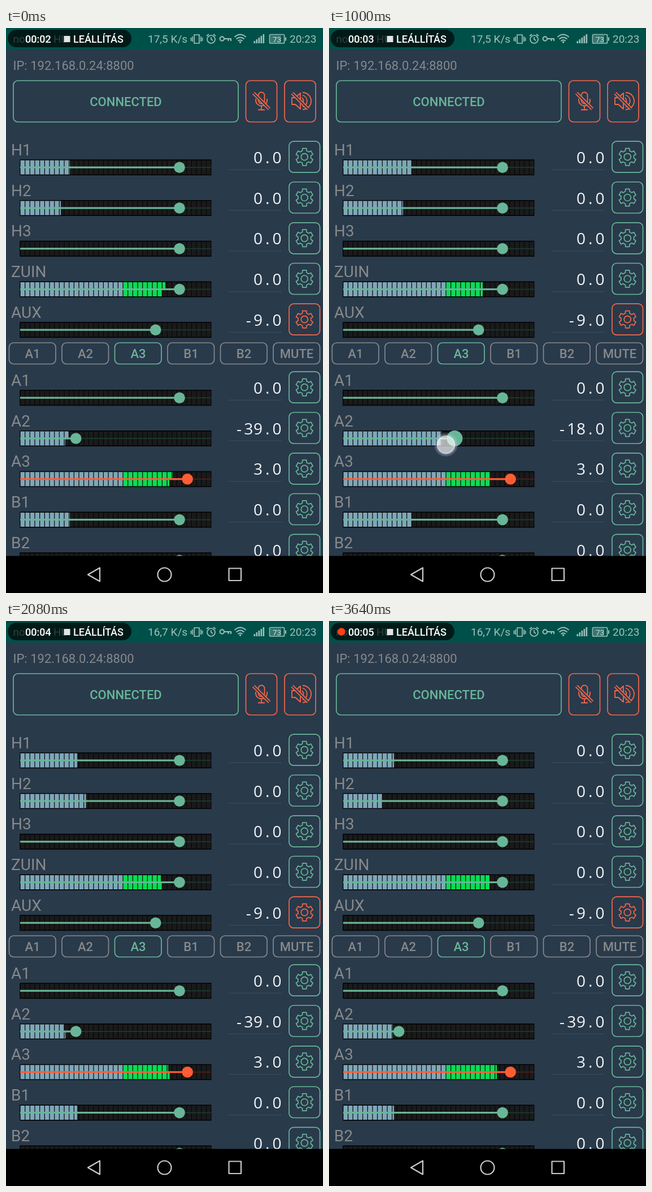
An HTML page with a canvas that plays this animation: 561x998 px, repeating every 3.68 s.

```html
<!DOCTYPE html>
<html lang="hu">
<head>
<meta charset="utf-8">
<style>
  html, body { margin: 0; width: 100%; height: 100%; overflow: hidden; background: #293a4b; }
  canvas { display: block; }
</style>
</head>
<body>
<canvas id="stage" width="561" height="998"></canvas>
<script>
const g = document.getElementById('stage').getContext('2d');
const LOOP = 3680, PX_PER_DB = 4.7, ZERO_X = 307;
const GREEN = '#68b698', ORANGE = '#f4674a', GREY = '#87898a', ICON = '#a0c0bb';

// Meter ends in px at the key times
const KEY_TIMES = [0, 600, 1000, 1600, 2560, 3200, 3640];
const LEVELS = {
  voice: [113, 116, 146, 131, 116, 120, 115],
  second: [97, 92, 131, 189, 89, 96, 94],
  left: [282, 284, 272, 270, 273, 268, 284],
  right: [276, 284, 272, 275, 273, 281, 284]
};
const METER_X = 25, METER_W = 338, SEGMENTS = 39;

const TOUCH_START = 280, TOUCH_END = 1900;
const TOUCH_TIMES = [280, 520, 600, 820, 1000, 1600, 1800];
const TOUCH_X = [123, 211, 214, 226, 207, 140, 123];
const TOUCH_Y = [727, 727, 727, 731, 736, 749, 752];

function tween(t, times, values, wobble = 0) {
  if (t <= times[0]) return values[0];
  const i = times.findIndex(k => k >= t);
  if (i < 0) return values[values.length - 1];
  const u = (t - times[i - 1]) / (times[i] - times[i - 1]);
  const ease = (1 - Math.cos(Math.PI * u)) / 2;
  return values[i - 1] + (values[i] - values[i - 1]) * ease
    + wobble * Math.sin(Math.PI * u) * Math.sin(t / 75);
}

const level = (t, name) => tween(t, KEY_TIMES, LEVELS[name], 5);
const dragDb = t => 3 * Math.round((tween(t, TOUCH_TIMES, TOUCH_X) - ZERO_X) / PX_PER_DB / 3);

function rect(x, y, w, h, color) {
  g.fillStyle = color;
  g.fillRect(x, y, w, h);
}

function disc(x, y, r, color) {
  g.fillStyle = color;
  g.beginPath();
  g.arc(x, y, r, 0, 7);
  g.fill();
}

function text(str, x, y, font, color, align = 'left') {
  g.font = font;
  g.fillStyle = color;
  g.textAlign = align;
  g.fillText(str, x, y);
}

function line(path, color, width = 2, x = 0, y = 0) {
  g.save();
  g.translate(x, y);
  g.strokeStyle = color;
  g.lineWidth = width;
  g.lineJoin = 'round';
  g.stroke(new Path2D(path));
  g.restore();
}

function box(x, y, w, h, color, r = 8) {
  g.strokeStyle = color;
  g.lineWidth = 1.7;
  g.beginPath();
  g.roundRect(x, y, w, h, r);
  g.stroke();
}

function gearPath() {
  const points = [];
  for (let k = 0; k < 6; k++) {
    for (const [r, deg] of [[11.5, -19], [15.5, -13], [15.5, 13], [11.5, 19]]) {
      const a = (k * 60 - 90 + deg) * Math.PI / 180;
      points.push((r * Math.cos(a)).toFixed(2) + ' ' + (r * Math.sin(a)).toFixed(2));
    }
  }
  return 'M' + points.join('L') + 'ZM6 0A6 6 0 1 1-6 0A6 6 0 1 1 6 0';
}
const GEAR = gearPath();

function meter(y, left, right) {
  rect(24.5, y - 14, 339, 28, '#000');
  rect(25.5, y - 12.5, 337, 25, '#1a1a1a');
  [left, right].forEach((end, i) => {
    const top = y - 12.5 + i * 12.5;
    if (end > METER_X) rect(METER_X, top, Math.min(end, 207) - METER_X, 12.5, '#7fa7b8');
    if (end > 207) rect(207, top, end - 207, 12.5, '#0bdc55');
  });
  for (let i = 0; i < SEGMENTS; i++) {
    rect(METER_X + i * METER_W / SEGMENTS - 0.6, y - 12.5, 1.2, 25, '#05080a');
  }
}

// Values sit on a monospaced grid, right aligned
function value(db, y) {
  [...db.toFixed(1)].reverse().forEach((c, i) =>
    text(c, 479.6 - i * 16.8, y, '28px "Open Sans", sans-serif', '#f4f6f7', 'center'));
}

function strip(name, y, db, left = 0, right = left, o = {}) {
  const color = o.hot ? '#ff5c35' : GREEN;
  const x = ZERO_X + db * PX_PER_DB;
  text(name, 9, y - 21.5, '28px Roboto, sans-serif', GREY);
  meter(y, left, right);
  rect(x, y - 1, 363 - x, 2, o.hot ? '#4a1f1a' : '#19372f');
  rect(METER_X, y - 1.6, x - METER_X, 3.2, color);
  disc(x, y, o.pressed ? 14 : 9.8, color);
  rect(394, y + 3.5, 94, 1.2, '#3b4c5c');
  value(db, y - 7.5);
  const gearColor = o.open ? ORANGE : GREEN;
  box(501, y - 46, 54.5, 55, gearColor);
  line(GEAR, gearColor, 1.7, 528.2, y - 18.5);
}

function touch(x, y) {
  const glow = g.createRadialGradient(x, y, 13, x, y, 22);
  glow.addColorStop(0, 'rgba(255,255,255,.66)');
  glow.addColorStop(0.28, 'rgba(255,255,255,.8)');
  glow.addColorStop(0.4, 'rgba(190,205,235,.45)');
  glow.addColorStop(1, 'rgba(190,205,235,0)');
  disc(x, y, 22, glow);
}

function statusBar(t) {
  rect(0, 0, 561, 38, '#00504a');
  text('norvelin HU', 12.5, 26, '19px Roboto, sans-serif', ICON);
  g.fillStyle = 'rgba(0,0,0,.68)';
  g.beginPath();
  g.roundRect(3, 3, 219, 31, 15.5);
  g.fill();
  const clock = t + 200;
  if (clock % 1000 >= 500) disc(22, 19, 6.8, '#ff4019');
  const font = '500 18px Roboto, sans-serif';
  text('00:0' + (2 + Math.floor(clock / 1000)), 34, 25.7, font, '#fff');
  rect(102.5, 14, 11, 11, '#e4e4e4');
  text('LEÁLLÍTÁS', 119, 25.7, font, '#fff');

  const small = '19px Roboto, sans-serif';
  text(t < 1300 ? '17,5 K/s' : '16,7 K/s', 251, 26, small, ICON);
  line('M333 12h9v15h-9zM330 15v9M345 15v9M327.5 17v6M347.5 17v6', ICON, 1.7);
  line('M370 20a7 7 0 1 1-14 0a7 7 0 1 1 14 0M363 16v4l3 2M355 14l4-3M371 14l-4-3', ICON, 1.7);
  line('M386 19a3.7 3.7 0 1 1-7.4 0a3.7 3.7 0 1 1 7.4 0h12v4M393.5 19v4', ICON, 2);
  line('M404.5 16q10-9 20 0M407.5 19.5q7-6 14 0M410.5 23q4-3.5 8 0', ICON, 2);
  disc(414.5, 25, 1.7, ICON);
  for (let i = 0; i < 5; i++) rect(438.5 + i * 4, 23 - i * 3, 2.6, 4 + i * 3, ICON);
  rect(468, 13, 19, 13, 'rgba(160,192,187,.35)');
  box(466.5, 11.5, 26, 15.5, ICON, 2);
  rect(494, 16.5, 2, 6, ICON);
  text('73', 479.5, 24.5, '13.5px Roboto, sans-serif', '#d0e0dd', 'center');
  text('20:23', 502, 26, small, ICON);
}

// Outlined bar across an icon
function slash(x, y) {
  const path = 'M-14-14L14 14';
  line(path, ORANGE, 6, x, y);
  line(path, '#293a4b', 2.4, x, y);
}

function header() {
  text('IP: 192.168.0.24:8800', 12.5, 73.5, '22px Roboto, sans-serif', GREY);
  box(13, 93, 398, 73, GREEN);
  text('CONNECTED', 212, 138, '500 22px Roboto, sans-serif', GREEN, 'center');
  box(424.5, 93, 55, 73, ORANGE);
  box(493, 93, 55, 73, ORANGE);
  line('M446.5 119a5.5 5.5 0 0 1 11 0v9a5.5 5.5 0 0 1-11 0zM442 125v3a10 9.5 0 0 0 20 0v-3M452 138v6M446 144.5h12', ORANGE, 1.8);
  line('M506 123h6l9-8v28l-9-8h-6zM524 123q5 6 0 12M525 118.5a11 11 0 0 1 0 21M525 114a15 15 0 0 1 0 30', ORANGE, 1.8);
  slash(452, 129);
  slash(520.5, 129);
}

function busButtons() {
  ['A1', 'A2', 'A3', 'B1', 'B2', 'MUTE'].forEach((name, i) => {
    const x = 5.5 + i * 93.5, color = i === 2 ? GREEN : GREY;
    box(x, 556, 82.5, 37.5, color);
    text(name, x + 41.5, 583, '500 22px Roboto, sans-serif', color, 'center');
  });
}

function navBar() {
  rect(0, 932.5, 561, 66, '#000');
  line('M145 965.5L166 953.5V977.5ZM292.5 965.5a12 12 0 1 1-24 0a12 12 0 1 1 24 0M394.5 954.5h21.5v21.5h-21.5z', '#c9cccc', 2.2);
}

function draw(t) {
  const voice = level(t, 'voice'), second = level(t, 'second');
  const left = level(t, 'left'), right = level(t, 'right');
  const pressed = t >= TOUCH_START && t < TOUCH_END;
  const gain = 12 + PX_PER_DB * dragDb(t - 277);

  rect(0, 0, 561, 998, '#293a4b');
  statusBar(t);
  header();
  strip('H1', 246.2, 0, voice);
  strip('H2', 318, 0, second);
  strip('H3', 389.8, 0);
  strip('ZUIN', 461.5, 0, left, right);
  strip('AUX', 533.2, -9, 0, 0, { open: true });
  busButtons();
  strip('A1', 653.2, 0);
  strip('A2', 725, dragDb(t - 90), left + gain, right + gain, { pressed });
  strip('A3', 796.8, 3, left + 13, right + 13, { hot: true });
  strip('B1', 868.5, 0, voice);
  strip('B2', 940.3, 0);
  if (pressed) touch(tween(t, TOUCH_TIMES, TOUCH_X), tween(t, TOUCH_TIMES, TOUCH_Y));
  navBar();
}

const start = performance.now();
function tick() {
  const t = (performance.now() - start) % LOOP;
  draw(Math.floor(t / 40) * 40);
  requestAnimationFrame(tick);
}
tick();
</script>
</body>
</html>
```
